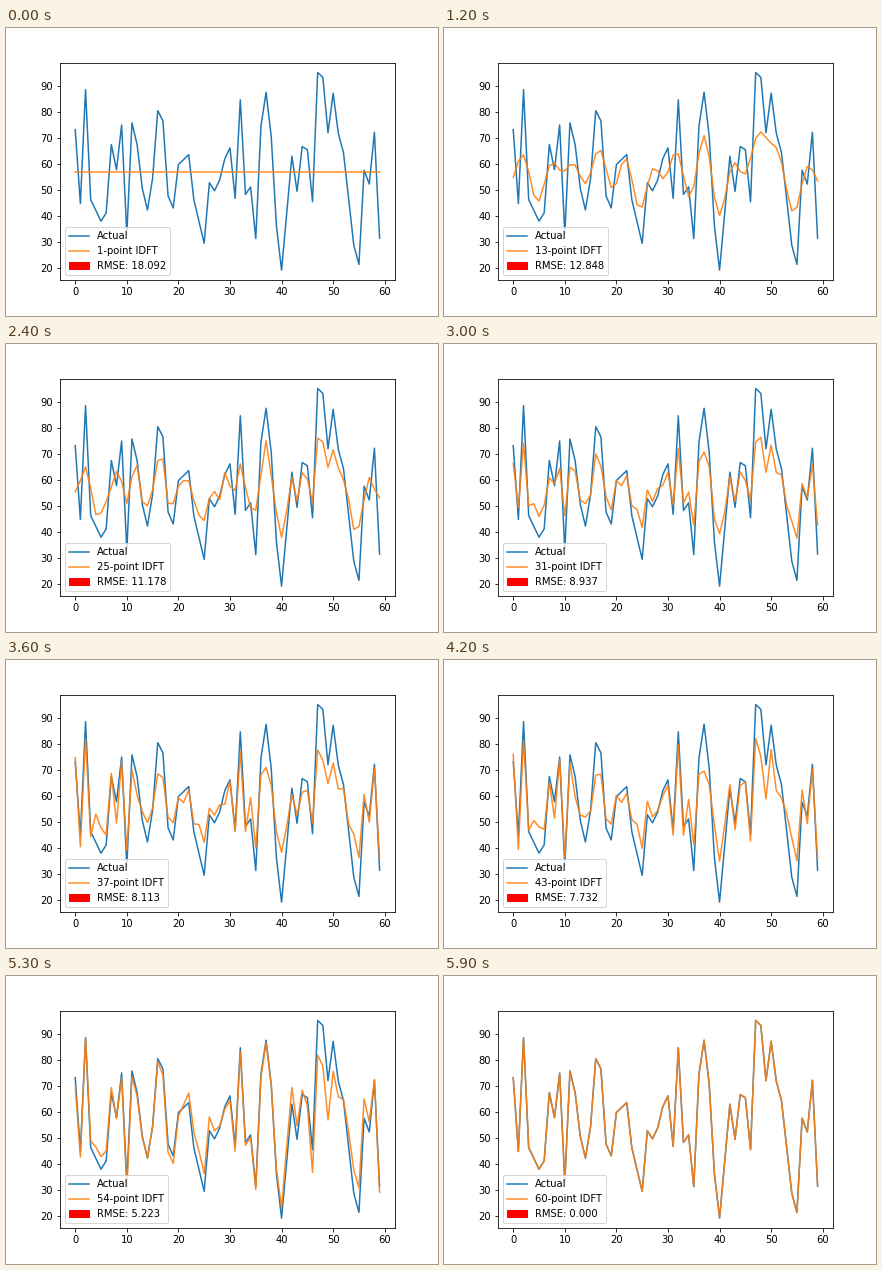
Animation of 432 by 288 pixels, one loop 6000 ms. Source, as a matplotlib script:

```python
import numpy as np
import matplotlib.pyplot as plt
from matplotlib.animation import FuncAnimation
from matplotlib.patches import Patch

plt.rcParams["font.family"] = "DejaVu Sans"
plt.rcParams["font.size"] = 10

_ = np.nan  # steps between key points, filled by easing
KEY_POINTS = np.array([
    73.2, 44.8, 88.6, 46.3, _, 38, 41.2, 67.5, 57.8, 75,
    33, 75.8, _, _, 42.3, 54.5, 80.5, 76.6, 47.7, 43.1,
    59.8, _, 63.6, 46.2, _, 29.5, 52.8, 49.7, _, _,
    66.2, 46.8, 84.7, 48.3, 51.2, 31.3, 74.5, 87.6, _, _,
    19.2, _, 63, 49.5, 66.7, 65.5, 45.5, 95.2, 93.3, 72,
    87.2, 71.8, _, _, _, 21.4, 57.6, 52.3, 72.2, 31.5])


def ease_between(points):
    """Fill the gaps with a cosine ease from one key point to the next."""
    keys = np.flatnonzero(~np.isnan(points))
    heights = points[keys]
    place = np.interp(np.arange(len(points)), keys, np.arange(len(keys)))
    left = np.floor(place).astype(int)
    right = np.minimum(left + 1, len(keys) - 1)
    t = (1 - np.cos(np.pi * (place - left))) / 2
    return heights[left] + t * (heights[right] - heights[left])


def idft(coef, n):
    """Rebuild the series from its first n DFT coefficients."""
    kept = np.where(np.arange(len(coef)) < n, coef, 0)
    return np.fft.ifft(kept).real


actual = ease_between(KEY_POINTS)
coef = np.fft.fft(actual)
x = np.arange(len(actual))

fig, ax = plt.subplots(figsize=(6, 4), dpi=72)
fig.subplots_adjust(left=0.125, right=0.9, bottom=0.125, top=0.88)

actual_line, = ax.plot(x, actual, color="C0", label="Actual")
idft_line, = ax.plot(x, actual, color="C1", alpha=0.9)
rmse_patch = Patch(color="red")


def update(frame):
    n = frame + 1
    approx = idft(coef, n)
    rmse = np.sqrt(np.mean((actual - approx) ** 2))
    idft_line.set_ydata(approx)
    idft_line.set_label(f"{n}-point IDFT")
    rmse_patch.set_label(f"RMSE: {rmse:.3f}")
    ax.legend(handles=[actual_line, idft_line, rmse_patch], loc="lower left")
    return []


anim = FuncAnimation(fig, update, frames=len(x), init_func=lambda: update(0),
                     interval=100, repeat=True, repeat_delay=0)
plt.show()
```
